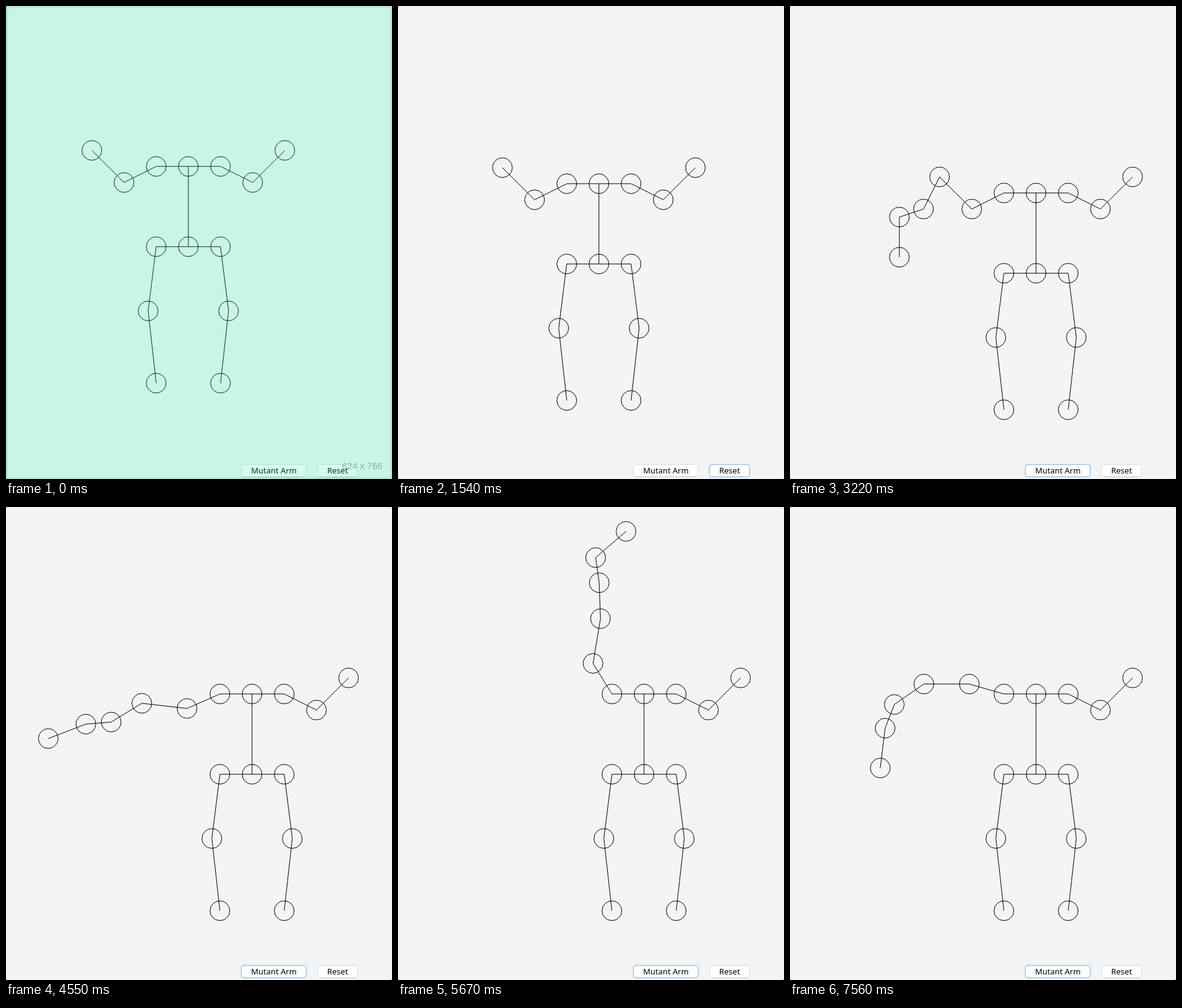
Write an HTML page that moves like this. It is 624 px wide and 766 px high and loops after 7770 ms.

```html
<!DOCTYPE html>
<html lang="en">
<head>
<meta charset="utf-8">
<title>Skeleton arm</title>
<style>
  html, body { margin: 0; width: 100%; height: 100%; overflow: hidden; background: #f4f4f4; }
  svg { display: block; width: 624px; height: 766px; }
  #figure { fill: none; stroke: #000; stroke-width: 1; }
  .button text { font: 13px "Noto Sans", "Open Sans", sans-serif; text-anchor: middle; fill: #000; }
  .face { fill: #fff; stroke: #d9d9d9; }
  .shade { stroke: #c2c2c2; }
  .ring { fill: none; stroke: #9dc3ea; stroke-width: 1.5; }
  .size { font: 15px "Liberation Sans", Arial, sans-serif; fill: #8bb0a1; }
</style>
</head>
<body>
<svg viewBox="0 0 624 766">
  <rect width="624" height="766" fill="#f4f4f4"/>
  <path d="M0 0h2l-2 2zM624 0h-2l2 2zM0 766h2l-2-2zM624 766h-2l2-2z" fill="#aaa"/>
  <path id="figure"/>
  <g class="button">
    <rect class="face" x="380.5" y="742.5" width="105" height="20" rx="4"/>
    <path class="shade" d="M384 762.5h98"/>
    <rect id="armRing" class="ring" x="380.5" y="742.5" width="105" height="20" rx="4"/>
    <text x="433" y="757">Mutant Arm</text>
  </g>
  <g class="button">
    <rect class="face" x="503.5" y="742.5" width="65" height="20" rx="4"/>
    <path class="shade" d="M507 762.5h58"/>
    <rect id="resetRing" class="ring" x="503.5" y="742.5" width="65" height="20" rx="4"/>
    <text x="536" y="757">Reset</text>
  </g>
  <g id="selection">
    <rect width="624" height="766" fill="#26fab0" fill-opacity=".2"/>
    <g fill="none" stroke="#4a9c80" stroke-opacity=".1">
      <rect x="1" y="1" width="622" height="764" stroke-width="2"/>
      <rect x="1" y="1" width="622" height="764" stroke-width="5"/>
    </g>
    <text class="size" x="543" y="750">624 x 766</text>
  </g>
</svg>
<script>
const LOOP = 7770, STEP = 70, RADIUS = 16;
const DRAG_BODY = 1260, GROW = 3220, DRAG_ARM = 4340;

// resting left arm, segment by segment
const REST = [[-52, 26], [-52, -52], [-26, 52], [-39, 13], [0, 65]];
const LENGTHS = REST.map(([x, y]) => Math.hypot(x, y));
const REST_ANGLES = REST.map(([x, y]) => Math.atan2(-y, -x) * 180 / Math.PI);

// time, x, y
const bodyPath = [[1190, 0, 0], [1330, -8, -2], [1540, 30, 28], [1890, 103, 43]];

// time, angle at shoulder, angle at hand, roundness of the bend between them
const armBends = [
  [4690, -22, 25, 1],
  [5110, 0, 113, 1.15],
  [5180, 4, 155, 1],
  [5600, 52, 165, 2],
  [6020, 90, 10, 1.6],
  [6230, 64, -23, 1.5],
  [6510, 42, -62, 2.4],
  [6790, 16, -83, 3.1]
];

const byId = id => document.getElementById(id);
const mix = (a, b, p) => a + (b - a) * p;
const progress = (t, from, to) => Math.min(1, Math.max(0, (t - from) / (to - from)));

function sample(keys, t) {
  const next = keys.findIndex(key => key[0] > t);
  if (next === 0) return keys[0].slice(1);
  if (next < 0) return keys[keys.length - 1].slice(1);
  const a = keys[next - 1], b = keys[next];
  const p = progress(t, a[0], b[0]);
  return a.slice(1).map((v, i) => mix(v, b[i + 1], p));
}

const circle = ([x, y]) =>
  `M${x - RADIUS} ${y}a16 16 0 1 1 32 0a16 16 0 1 1 -32 0z`;
const line = (a, b) => `M${a}L${b}`;
const chain = points => points.slice(1).map((p, i) => line(points[i], p)).join("");

// Degrees above the leftward direction for every arm segment.
function armAngles(t) {
  const [root, tip, round] = sample(armBends, t);
  const pulled = progress(t, DRAG_ARM, armBends[0][0]);
  // the arm folds into an S while its bend turns over
  const sway = 65 * Math.sin(Math.PI * progress(t, 5600, 6020));
  return REST_ANGLES.map((rest, i) => {
    const u = i / (REST.length - 1);
    const bend = u * u * (round - (round - 1) * u);
    const angle = mix(root, tip, bend) + sway * Math.sin(2 * Math.PI * u);
    return mix(rest, angle, pulled);
  });
}

function leftArm(shoulder, t) {
  const joints = [shoulder];
  let [x, y] = shoulder;
  armAngles(t).slice(0, t < GROW ? 2 : REST.length).forEach((angle, i) => {
    const a = angle * Math.PI / 180;
    x -= LENGTHS[i] * Math.cos(a);
    y -= LENGTHS[i] * Math.sin(a);
    joints.push([x, y]);
  });
  return joints;
}

function drawFigure(t) {
  const [dx, dy] = sample(bodyPath, t).map(Math.round);
  const at = (x, y) => [294.8 + dx + x, 259.8 + dy + y];
  const neck = at(0, 0), pelvis = at(0, 130);
  const left = leftArm(at(-52, 0), t);
  const right = [at(52, 0), at(104, 26), at(156, -26)];
  const leg = side => [at(52 * side, 130), at(65 * side, 234), at(52 * side, 351)];
  const limbs = [left, right, leg(-1), leg(1)];

  byId("figure").setAttribute("d",
    [neck, pelvis, ...limbs.flat()].map(circle).join("") +
    limbs.map(chain).join("") +
    line(left[0], right[0]) + line(neck, pelvis) + line(limbs[2][0], limbs[3][0]));
}

function show(id, visible) {
  byId(id).style.display = visible ? "" : "none";
}

function render(time) {
  const t = Math.floor(time % LOOP / STEP) * STEP;
  drawFigure(t);
  show("selection", t < STEP);
  show("resetRing", t >= DRAG_BODY && t < GROW);
  show("armRing", t >= GROW);
}

const start = performance.now();
function tick() {
  render(performance.now() - start);
  requestAnimationFrame(tick);
}
tick();
</script>
</body>
</html>
```
